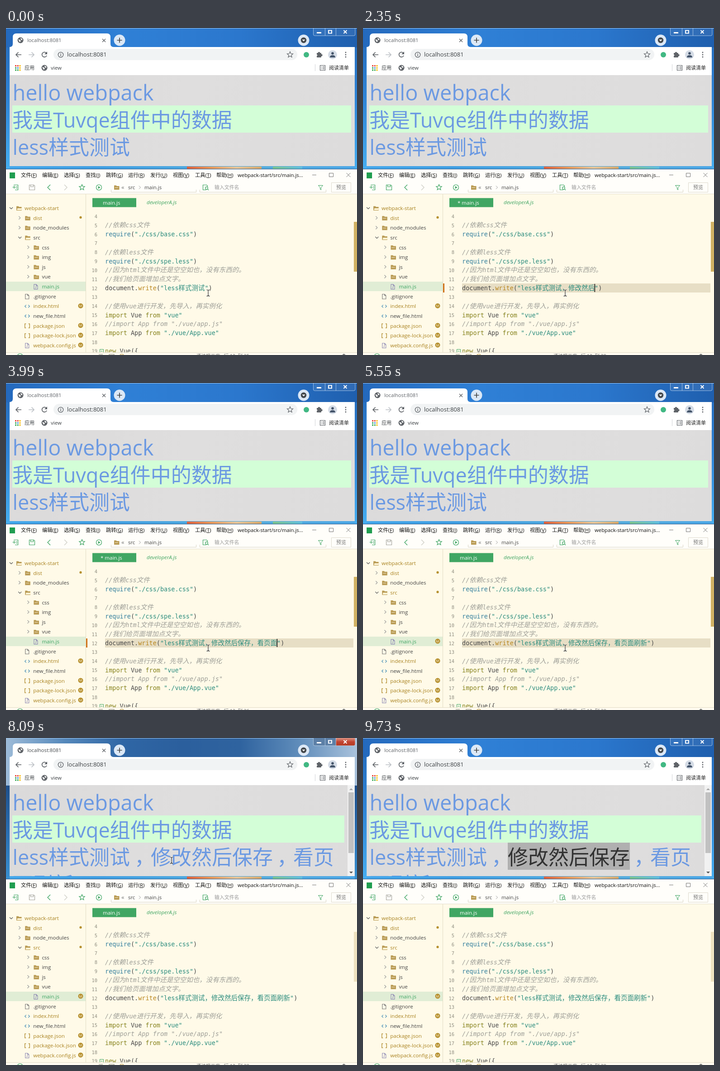
Recreate the animation shown at these times as an HTML page with a canvas. Size 776 by 722 pixels, loop 9770 ms.

```html
<!DOCTYPE html>
<html lang="zh-CN">
<head>
<meta charset="utf-8">
<style>
html, body { margin: 0; width: 100%; height: 100%; overflow: hidden; }
canvas { display: block; }
</style>
</head>
<body>
<canvas id="stage" width="776" height="722"></canvas>
<script>
const ctx = document.getElementById('stage').getContext('2d');
const LOOP = 9770;
const UI = '"Open Sans", "Noto Sans CJK SC", "Noto Sans CJK", sans-serif';
const MONO = '"DejaVu Sans Mono", "Noto Sans Mono", monospace';
const CJK = '"Noto Sans CJK SC", "Noto Sans CJK", sans-serif';
const COMMA = '\uff0c';
const GREEN = '#3fa563', OCHRE = '#a9821f', DARK = '#444444', GREY = '#5f6368', BLUE = '#6b99e2';
const AT = { focus: 420, comma: 1000, save: 5150, badge: 5420, refresh: 6100, leave: 7200, active: 7850, inactive: 9600 };

// Phrases entered through an input method: start, keystrokes, ms per key, result
const PHRASES = [
  [AT.comma, '', 0, COMMA],
  [1310, 'xiugai', 70, '修改'],
  [1830, 'ranhou', 65, '然后'],
  [2450, 'baocun', 75, '保存'],
  [3020, '', 0, COMMA],
  [3200, 'kanyemian', 75, '看页面'],
  [4150, 'shuaxin', 85, '刷新']
];
const TYPING_END = 4750;

// Pointer path: time, x, y
const POINTER = [[0, 447, 585], [7050, 447, 585], [7700, 385, 277], [8090, 366, 270],
  [8350, 321, 267], [8450, 321, 267], [9150, 590, 267], [9400, 592, 267], [9720, 620, 735]];

function rect(x, y, w, h, color, radius = 0) {
  ctx.fillStyle = color;
  ctx.beginPath();
  ctx.roundRect(x, y, w, h, radius);
  ctx.fill();
}
function disc(x, y, r, color) {
  rect(x - r, y - r, 2 * r, 2 * r, color, r);
}
function ring(x, y, r, color, width = 1.2) {
  ctx.strokeStyle = color;
  ctx.lineWidth = width;
  ctx.beginPath();
  ctx.arc(x, y, r, 0, 7);
  ctx.stroke();
}
function line(d, color, width = 1.2) {
  ctx.strokeStyle = color;
  ctx.lineWidth = width;
  ctx.stroke(new Path2D(d));
}
function shape(d, color) {
  ctx.fillStyle = color;
  ctx.fill(new Path2D(d));
}
function text(str, x, y, color, size = 11.4, style = '', family = UI) {
  ctx.font = `${style} ${size}px ${family}`;
  ctx.fillStyle = color;
  ctx.fillText(str, x, y);
  return x + ctx.measureText(str).width;
}
function gradient(x0, y0, x1, y1, ...colors) {
  const g = ctx.createLinearGradient(x0, y0, x1, y1);
  colors.forEach((c, i) => g.addColorStop(i / (colors.length - 1), c));
  return g;
}
function clipped(x, y, w, h, draw) {
  ctx.save();
  ctx.beginPath();
  ctx.rect(x, y, w, h);
  ctx.clip();
  draw();
  ctx.restore();
}
function star(x, y, r, color) {
  let d = '';
  for (let i = 0; i < 10; i++) {
    const a = i * Math.PI / 5 - Math.PI / 2, k = i % 2 ? r * 0.45 : r;
    d += (i ? 'L' : 'M') + (x + k * Math.cos(a)) + ' ' + (y + k * Math.sin(a));
  }
  line(d + 'Z', color);
}
function globe(x, y) {
  disc(x, y, 6.5, GREY);
  shape(`M${x - 5} ${y - 2}l4 1l2 3l-3 2zM${x} ${y - 5}l4 2l0 3l-3 -1z`, '#fff');
}

function pointerAt(t) {
  const i = POINTER.findIndex(p => p[0] > t);
  if (i < 0) return POINTER.at(-1).slice(1);
  const [t0, x0, y0] = POINTER[i - 1], [t1, x1, y1] = POINTER[i];
  const u = (t - t0) / (t1 - t0), k = u * u * (3 - 2 * u);
  return [x0 + (x1 - x0) * k, y0 + (y1 - y0) * k];
}
function typedAt(t) {
  let out = '';
  for (const [start, keys, step, result] of PHRASES) {
    if (t < start) break;
    const n = step ? Math.floor((t - start) / step) + 1 : 1;
    out += n > keys.length ? result : keys.slice(0, n);
  }
  return out;
}

function windowFrame(active) {
  if (active) {
    rect(0, 0, 776, 105, gradient(0, 0, 776, 0, '#9dbbd8', '#5588bb', '#2f66a5', '#2b5f9d', '#2f639f', '#5f8cba', '#a9c2dc'));
    rect(0, 105, 776, 207, gradient(0, 105, 0, 312, '#1f4f8a', '#2a6fb2', '#3990cf'));
  } else {
    rect(0, 0, 776, 312, gradient(0, 0, 0, 312, '#2569b9', '#2f84d6', '#46aef0'));
    rect(0, 0, 776, 43, gradient(0, 0, 776, 0, '#2469bd', '#2f80d6', '#2b77cd', '#1f5fae'));
  }
  rect(0, 0, 776, 1, '#9dc3e8');
  rect(8, 305, 763, 7, gradient(8, 0, 771, 0, '#43a7eb', '#3f9ee2', '#4ba7e0', '#55acdd', '#4aa6e6'));
  rect(400, 306, 165, 5, gradient(400, 0, 565, 0, '#e0613c', '#e89a5c', '#e5c69b', '#d8a86a'));
  rect(590, 306, 65, 5, gradient(590, 0, 655, 0, '#7dc48c', '#5fbfe0'));
  rect(0, 311, 776, 1, '#29588c');

  rect(679, -4, 93, 21, active ? '#5c7fa6' : 'rgba(255,255,255,.07)', 4);
  if (active) rect(729, -4, 43, 21, gradient(0, 0, 0, 17, '#dd9585', '#c24431', '#b43a22'), [0, 0, 4, 0]);
  line('M679.5 0V14q0 3 3 3H769q3 0 3-3V0M705.5 0V17M729.5 0V17', 'rgba(205,225,245,.7)', 1);
  rect(687, 9, 10, 3, '#fff');
  line('M713 5.5h7v6h-7z', '#fff', 2);
  line('M746.5 5l7 7M753.5 5l-7 7', '#fff', 2);

  shape('M8 42q7 0 7-7V20q0-8 8-8H223q8 0 8 8V35q0 7 7 7Z', '#fff');
  globe(32, 27);
  text('localhost:8081', 47, 31, active ? '#45494d' : GREY, 11.2);
  line('M213 24l7 7M220 24l-7 7', GREY, 1.4);
  disc(251, 27, 12.5, '#dce8f6');
  line('M245.5 27h11M251 21.5v11', '#444', 1.7);
  disc(658, 27, 12.5, '#dce8f6');
  disc(658, 27, 6.2, '#45494d');
  shape('M654.5 25.5h7l-3.5 4z', '#fff');
}

function browserBars() {
  rect(8, 42, 763, 62, '#fff');
  line('M34 59H22M27.5 53.5L22 59l5.5 5.5', GREY, 1.7);
  line('M50 59H62M56.5 53.5L62 59l-5.5 5.5', '#bdc1c6', 1.7);
  line('M89.6 56A5.4 5.4 0 1 0 90 60.8', GREY, 1.7);
  shape('M91 52v6h-6z', GREY);
  rect(105, 46, 539, 25, '#f1f3f4', 12.5);
  ring(121, 59, 5.7, GREY, 1.3);
  rect(120.3, 58, 1.5, 4, GREY);
  rect(120.3, 55.4, 1.5, 1.5, GREY);
  text('localhost:8081', 135, 63, '#3c4043', 13);
  star(628, 59, 6.8, GREY);
  disc(664, 59, 6, '#41b883');
  rect(687, 55, 10, 10, GREY, 1);
  disc(692, 55, 2.2, GREY);
  disc(697.5, 60, 2.2, GREY);
  disc(687, 60, 1.5, '#fff');
  disc(722, 59, 10, '#d5dce6');
  disc(722, 56, 2.8, '#44546a');
  shape('M716 65q0-5 6-5t6 5z', '#44546a');
  [54, 59, 64].forEach(y => disc(751, y, 1.4, GREY));

  const dots = ['#e94335', '#e94335', '#f9bb05', '#33a753', '#4285f4', '#f9bb05', '#33a753', '#33a753', '#f9bb05'];
  dots.forEach((c, i) => rect(20 + i % 3 * 4.7, 82 + Math.floor(i / 3) * 4.7, 3, 3, c));
  text('应用', 41, 92, '#3c4043', 11);
  globe(85, 88);
  text('view', 99, 92, '#3c4043', 11.5);
  rect(683, 80, 1, 15, '#d0d3d7');
  line('M694.5 82.5h11v11h-11zM697 85.5h1.5M700 85.5h4M697 88h1.5M700 88h4M697 90.5h1.5M700 90.5h4', GREY);
  text('阅读清单', 714, 92, '#222', 11);
}

function page(t, pointer) {
  const refreshed = t >= AT.refresh;
  clipped(8, 104, 763, 201, () => {
    rect(8, 104, 763, 201, gradient(8, 104, 771, 305, '#dbdada', '#dfdede', '#dddcdc'));
    rect(14, 171, refreshed ? 734 : 749, 60, '#d3fed7');
    text('hello webpack', 14.5, 160, BLUE, 46.8);
    text('我是Tuvqe组件中的数据', 14, 220, BLUE, 45);
    text('less样式测试', 14.5, 280, BLUE, 45);
    if (!refreshed) return;

    text(COMMA, 284, 280, BLUE, 45);
    text('修改然后保存', 320, 280, BLUE, 45);
    text(COMMA, 599, 280, BLUE, 45);
    text('看页', 635, 280, BLUE, 45);
    text('面刷新', 14, 340, BLUE, 45);

    const count = t < 8450 ? 0 : t > 9150 ? 6 : Math.round((pointer[0] - 320) / 45);
    if (count > 0) {
      const focused = t < AT.inactive;
      rect(320, 231, count * 45, 60, focused ? '#4a96ec' : '#b0b0b0');
      text('修改然后保存'.slice(0, count), 320, 280, focused ? '#fff' : '#323232', 45);
    }
    rect(755, 104, 16, 201, '#f1f1f1');
    rect(757, 120, 12, 134, '#c1c1c1');
    shape('M759 115h8l-4-4z', '#a3a3a3');
    shape('M759 295h8l-4 4z', '#505050');
  });
}

function menuAndToolbar(dirty) {
  rect(0, 312, 776, 55, '#fffefa');
  rect(8, 319, 12, 13, '#1f9d50');
  const menus = [['文件', 'F', 33], ['编辑', 'E', 80], ['选择', 'S', 128], ['查找', 'I', 176], ['跳转', 'G', 221],
    ['运行', 'R', 270], ['发行', 'U', 319], ['视图', 'V', 369], ['工具', 'T', 418], ['帮助', 'H', 465]];
  for (const [label, key, x] of menus) {
    const left = text(label + '(', x, 329, '#111', 11.3);
    const right = text(key, left, 329, '#111', 11.3);
    text(')', right, 329, '#111', 11.3);
    rect(left, 330, right - left, 1, '#111');
  }
  text('webpack-start/src/main.js...', 512, 329, '#111', 11.3);
  line('M677 324.5h9M714.5 320.5h9v8h-9zM752.5 320l9 9M761.5 320l-9 9', '#777', 1);

  line('M17 346.5h9.5v11H20M14.5 351.5h7M18 348v7M22 350.5h3M22 353.5h3', GREEN);
  line('M51.5 346.5h10l2 2v9h-12zM54.5 347v3.5h6v-3.5', dirty ? GREEN : '#a5a59f');
  line('M98 346l-6 6l6 6', GREEN, 1.4);
  line('M129 346l6 6l-6 6', '#cfcfc6', 1.4);
  star(168, 352, 6.5, GREEN);
  ring(205.5, 352, 6, GREEN);
  shape('M203.7 349l5 3l-5 3z', GREEN);
  line('M232.5 357v5.5h188V357M428.5 357v5.5h279V357', '#d9d4c5', 1);
  folder(239, 352, false);
  text('«', 255, 356, '#777', 13);
  text('src', 270, 356, DARK);
  line('M294 348.5l3.5 3.5l-3.5 3.5', '#999', 1);
  text('main.js', 306, 356, DARK);
  line('M443 357.5h-7.5v-11h8l2 2v2', GREEN);
  ring(443.5, 353.5, 2.8, GREEN);
  line('M445.5 355.5l2.5 2.5', GREEN);
  text('输入文件名', 461, 356, '#999', 10.9);
  line('M690.5 347.5h10l-4 5v5l-2-1.5v-3.5z', GREEN, 1);
  line('M719.5 341.5h43v21h-43z', '#dedacd', 1);
  text('预览', 730, 356, '#777', 11);
  rect(0, 366, 776, 1, '#e4dfcd');
}

function folder(x, y, open) {
  const tan = '#b99b54';
  shape(`M${x} ${y - 4.5}h4.5l1.5 1.5h5.5v8h-11.5z`, tan);
  rect(x + 2, y, 7, 1, '#f6ead0');
  if (open) shape(`M${x + 2.5} ${y}h10l-1.5 4h-10z`, '#fff3d3');
}
function fileIcon(kind, x, y) {
  if (kind === 'html') return line(`M${x + 3.5} ${y - 3}l-3 3l3 3M${x + 8} ${y - 3}l3 3l-3 3`, '#4a90b8', 1.3);
  if (kind === 'json') return line(`M${x + 3} ${y - 4.5}h-2.5v9h2.5M${x + 8.5} ${y - 4.5}h2.5v9h-2.5`, OCHRE, 1.2);
  const color = kind === 'js' ? '#8d88b3' : '#777';
  line(`M${x + 1.5} ${y - 5}h5l3 3v7.5h-8zM${x + 6.5} ${y - 5}v3h3`, color, 1.1);
  if (kind === 'js') line(`M${x + 4} ${y + 3}q2 1 2-1v-3`, color, 1);
}
function badge(y) {
  disc(165, y, 5.5, '#b6902f');
  ctx.textAlign = 'center';
  text('M', 165, y + 2.7, '#fffae8', 7.5);
  ctx.textAlign = 'left';
}

// Rows: label, indent level, kind, modified
const TREE = [
  ['webpack-start', 0, 'open', true], ['dist', 1, 'folder', true], ['node_modules', 1, 'folder'],
  ['src', 1, 'open'], ['css', 2, 'folder'], ['img', 2, 'folder'], ['js', 2, 'folder'], ['vue', 2, 'folder'],
  ['main.js', 2, 'js'], ['.gitignore', 1, 'file'], ['index.html', 1, 'html', true], ['new_file.html', 1, 'html'],
  ['package.json', 1, 'json', true], ['package-lock.json', 1, 'json', true], ['webpack.config.js', 1, 'js', true]
];
function sidebar(saved) {
  rect(0, 560, 176, 21, '#e0edd5');
  TREE.forEach(([label, level, kind, modified], i) => {
    const y = 398 + i * 21.64, x = 22 + level * 19.2;
    const isFolder = kind === 'folder' || kind === 'open';
    const marked = modified || (saved && label === 'src');
    if (kind === 'open') line(`M${x - 14} ${y - 2}l3.5 3.5l3.5-3.5`, '#555');
    if (kind === 'folder') line(`M${x - 13} ${y - 4}l3.5 3.5l-3.5 3.5`, '#999');
    if (isFolder) folder(x + 1, y, kind === 'open');
    else fileIcon(kind, x, y);
    text(label, x + 19, y + 4, label === 'main.js' ? GREEN : marked ? OCHRE : DARK, 11.5);
    if (isFolder && marked && level) disc(165, y - 1.5, 2.6, '#b6902f');
    if (!isFolder && (marked || (saved && label === 'main.js'))) badge(y - 1);
  });
  rect(176, 367, 1, 349, '#e2dbc4');
}

const COLORS = { c: '#9d9e97', f: '#327f9d', s: '#2a8c7d', d: '#474747', w: '#b8851c', k: '#85821c' };
// Draws coloured runs; wide characters use their own font size
function codeRuns(runs, x, y) {
  for (const [kind, str] of runs) {
    for (const part of str.match(/[\u3000-\uffef]+|[^\u3000-\uffef]+/g) || []) {
      const wide = part.charCodeAt(0) >= 0x3000;
      x = text(part, x, y, COLORS[kind], wide ? 14.5 : 13.5, kind === 'c' ? 'italic' : '', wide ? CJK : MONO);
    }
  }
  return x;
}
function codeLines(typed) {
  const call = path => [['f', 'require'], ['d', '('], ['s', `"${path}"`], ['d', ')']];
  const load = (name, path) => [['k', 'import'], ['d', ` ${name} `], ['k', 'from'], ['s', ` "${path}"`]];
  const note = (...clauses) => [['c', '//' + clauses.join(COMMA)]];
  return {
    5: note('依赖css文件'), 6: call('./css/base.css'),
    8: note('依赖less文件'), 9: call('./css/spe.less'),
    10: note('因为html文件中还是空空如也', '没有东西的。'), 11: note('我们给页面增加点文字。'),
    12: [['d', 'document.'], ['w', 'write'], ['d', '('], ['s', `"less样式测试${typed}"`], ['d', ')']],
    14: note('使用vue进行开发', '先导入', '再实例化'), 15: load('Vue', 'vue'),
    16: note('import App from "./vue/app.js"'), 17: load('App', './vue/App.vue'),
    19: [['k', 'new'], ['d', ' Vue({']]
  };
}

function editor(t, dirty) {
  const typed = typedAt(t);
  const focused = t >= AT.focus && t < AT.active;
  rect(191, 375.5, 97, 20, '#40a663');
  text(dirty ? '* main.js' : 'main.js', dirty ? 209 : 214, 390, '#fff', 11.5);
  text('developerA.js', 311, 389, GREEN, 11.5, 'italic');

  if (focused) rect(219, 564, 549, 20, '#e7dec5');
  if (dirty) rect(177, 564, 3, 20, '#d0741a');
  const lines = codeLines(typed);
  for (let n = 4; n <= 19; n++) {
    const y = 416 + (n - 4) * 19.83;
    ctx.textAlign = 'right';
    text(n, 202, y + 4, '#8f8d80', 10.4, '', MONO);
    ctx.textAlign = 'left';
    codeRuns(lines[n] || [], 219, y + 4.5);
  }
  line('M207.5 709.5h8v8h-8zM209.5 713.5h4', GREEN, 1);

  const caretOn = t < TYPING_END || Math.floor((t - TYPING_END) / 530) % 2 === 0;
  if (focused && caretOn) {
    ctx.globalAlpha = 0;
    const x = codeRuns([['d', 'document.write("'], ['s', 'less样式测试' + typed]], 219, 578);
    ctx.globalAlpha = 1;
    rect(x - 0.5, 565, 1.6, 18, '#111');
  }
  rect(769, 428, 7, 110, t < AT.leave ? '#d1b263' : '#eee2c0');
}

function statusBar(t) {
  rect(0, 716, 776, 6, '#fffbf0');
  rect(0, 716, 776, 1, '#e2dbc4');
  clipped(0, 717, 776, 5, () => {
    ring(31, 725, 6, GREEN);
    line('M205 720.5h9M228 720.5h11v8h-11z', '#8f8d80');
    ring(256, 725, 5, '#b6902f');
    const column = 25 + typedAt(t).length;
    text(`语法提示库   行:12  列:${column}`, 421, 728, '#666', 10.5);
    shape('M743 722l4-3l4 3z', '#777');
  });
}

function iBeam([x, y]) {
  const d = `M${x - 3.5} ${y - 7}q3.5 0 3.5 2v10q0 2-3.5 2M${x + 3.5} ${y - 7}q-3.5 0-3.5 2v10q0 2 3.5 2`;
  line(d, 'rgba(255,255,255,.6)', 2.4);
  line(d, '#222', 1.1);
}

function draw(t) {
  const pointer = pointerAt(t);
  const dirty = t >= AT.comma && t < AT.save;
  windowFrame(t >= AT.active && t < AT.inactive);
  browserBars();
  page(t, pointer);
  rect(0, 312, 776, 410, '#fffae8');
  menuAndToolbar(dirty);
  sidebar(t >= AT.badge);
  editor(t, dirty);
  statusBar(t);
  iBeam(pointer);
}

function tick() {
  draw(performance.now() % LOOP);
  requestAnimationFrame(tick);
}
tick();
</script>
</body>
</html>
```
